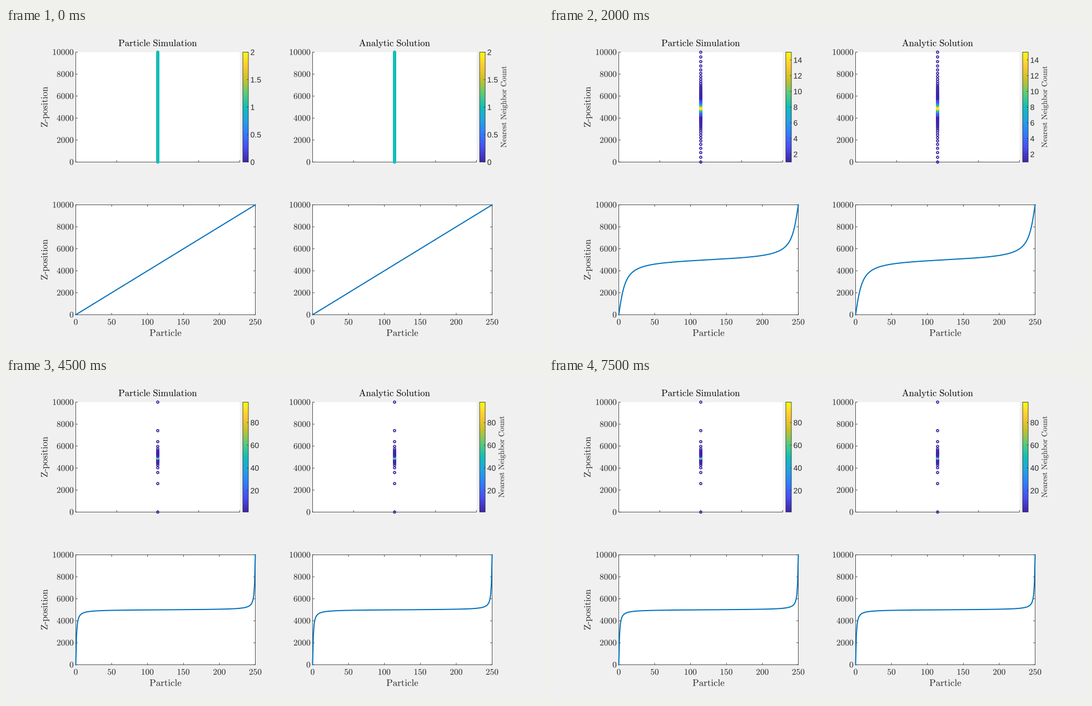
A matplotlib script that plays this animation: 966 by 580 pixels, repeating every 8000 ms.

```python
import numpy as np
import matplotlib.pyplot as plt
from matplotlib.animation import FuncAnimation
from matplotlib.colors import LinearSegmentedColormap
from matplotlib.patches import PathPatch, Rectangle
from matplotlib.path import Path
from matplotlib.textpath import TextPath
from matplotlib.transforms import Affine2D

W, H, DPI = 966, 580, 100
PX = 72 / DPI
INK, BLUE = "#262626", "#0072BD"
THIN = 0.8 * PX
FRAMES, INTERVAL = 16, 500
N = 251
LENGTH = 10000
RADIUS = 26.6            # neighbour search distance
GAIN = 4.8               # peak compression exponent
SHIFT = 426              # distance between the two columns
LEFT, RIGHT_TOP, RIGHT_LOW = 125.5, 420.5, 448.5
TOP1, BOT1, TOP2, BOT2 = 43.5, 241.5, 318.5, 516.5
BAR_X, BAR_W = 426, 10

plt.rcParams["mathtext.fontset"] = "cm"

PARULA = LinearSegmentedColormap.from_list("parula", [
    "#3e26a8", "#484df0", "#337bfd", "#22a3e3", "#12beb9",
    "#5ccc76", "#c9c129", "#fdca33", "#f9fb15"])

fig = plt.figure(figsize=(W / DPI, H / DPI), dpi=DPI, facecolor="#F0F0F0")
ax = fig.add_axes([0, 0, 1, 1])
ax.axis("off")


def text(s, x, y, size, ha=0.5, up=False, serif=True, color=INK):
    """Text with its baseline at pixel (x, y); `up` turns it to read upwards."""
    if serif:
        body = s.replace(" ", r"\ ").replace("-", r"\hspace{0.333}")
        path = TextPath((0, 0), rf"$\mathrm{{{body}}}$", size=size)
    else:
        path = TextPath((0, 0), s, size=size, prop={"family": "Liberation Sans"})
    if s.startswith("Z-"):  # mathtext would set a wide minus sign
        dash = Affine2D().scale(.265 * size, .058 * size).translate(.622 * size, .187 * size)
        path = Path.make_compound_path(path, Path.unit_rectangle().transformed(dash))
    box = path.get_extents()
    dx = -(box.x0 + ha * box.width) if ha else 0
    place = Affine2D().translate(dx, 0).scale(1, -1)
    if up:
        place.rotate_deg(-90)
    place.translate(x, y)
    patch = PathPatch(path.transformed(place), fc=color, lw=0, zorder=6, snap=False)
    return ax.add_patch(patch)


def seg(x0, y0, x1, y1):
    return ax.plot([x0, x1], [y0, y1], color=INK, lw=THIN, zorder=3,
                   solid_capstyle="butt", snap=False)[0]


def y_axis(x, top, bottom, mirror=None):
    for v in range(0, LENGTH + 1, 2000):
        y = bottom + (top - bottom) * v / LENGTH
        seg(x, y, x + 3.5, y)
        if mirror:
            seg(mirror - 3.5, y, mirror, y)
        text(str(v), x - 4.3, y + 4.9, 15.4, ha=1)
    seg(x, top, x, bottom)


def panel(dx):
    """Static parts of one column; returns its centre, markers and curve."""
    x0, x1, x2 = LEFT + dx, RIGHT_TOP + dx, RIGHT_LOW + dx
    mid = (x0 + x1) / 2
    for x, top, bottom in ((x1, TOP1, BOT1), (x2, TOP2, BOT2)):
        ax.add_patch(Rectangle((x0, top), x - x0, bottom - top, fc="white",
                               lw=0, zorder=0, snap=False))

    seg(x0, BOT1, x1, BOT1)
    for x in np.linspace(x0, x1, 5):
        seg(x, BOT1, x, BOT1 - 3.5)
    y_axis(x0, TOP1, BOT1)

    seg(x2, TOP2, x2, BOT2)
    for y in (TOP2, BOT2):
        seg(x0, y, x2, y)
    for v in range(0, 251, 50):
        x = x0 + (x2 - x0) * v / 250
        seg(x, BOT2, x, BOT2 - 3.5)
        seg(x, TOP2, x, TOP2 + 3.5)
        text(str(v), x, 534.4, 15.4)
    y_axis(x0, TOP2, BOT2, x2)
    text("Particle", (x0 + x2) / 2, 554.6, 16.9)

    bx = BAR_X + dx
    ax.imshow(np.linspace(1, 0, 256)[:, None], cmap=PARULA, aspect="auto",
              extent=(bx, bx + BAR_W, BOT1, TOP1), zorder=1)
    ax.add_patch(Rectangle((bx, TOP1), BAR_W, BOT1 - TOP1, fill=False,
                           ec=INK, lw=THIN, zorder=3, snap=False))

    dots = ax.scatter(np.full(N, mid), np.zeros(N), s=(4 * PX) ** 2, facecolors="none",
                      linewidths=1.75 * PX, clip_on=False, zorder=5)
    curve, = ax.plot(np.linspace(x0, x2, N), np.zeros(N), color=BLUE, lw=2 * PX,
                     solid_joinstyle="round", zorder=5, clip_on=False)
    return mid, dots, curve


def positions(k):
    """Particles driven towards the pressure node, the drive varying as a sine."""
    squeeze = np.exp(-GAIN * np.sin(np.pi * k / 24))
    u = np.linspace(-1, 1, N)
    phase = np.arctan(squeeze * np.tan(np.pi / 2 * u[1:-1])) * 2 / np.pi
    return LENGTH / 2 * (1 + np.r_[-1, phase, 1])


def tick_step(span):
    return next(s for s in (.5, 1, 2, 5, 10, 20, 50) if span / s < 8)


columns = [panel(0), panel(SHIFT)]
text("Particle Simulation", 273, 32.6, 16.8, color="black")
text("Analytic Solution", 273 + SHIFT, 32.6, 16.8, color="black")
for top, bottom in ((TOP1, BOT1), (TOP2, BOT2)):
    text("Z-position", 74.6, (top + bottom) / 2 - .5, 16.9, up=True)
ax.set_xlim(0, W)
ax.set_ylim(H, 0)
scale_marks = []


def draw_scale(lo, hi):
    while scale_marks:
        scale_marks.pop().remove()
    step = tick_step(hi - lo)
    ticks = np.arange(np.ceil(lo / step), np.floor(hi / step) + 1) * step
    names = [f"{v:g}" for v in ticks]
    for dx in (0, SHIFT):
        edge = BAR_X + BAR_W + dx
        for v, name in zip(ticks, names):
            y = BOT1 + (TOP1 - BOT1) * (v - lo) / (hi - lo)
            scale_marks.append(seg(edge - 2.5, y, edge, y))
            scale_marks.append(text(name, 439.6 + dx, y + 5.1, 14, ha=0, serif=False))
    # the side label keeps clear of the widest tick label
    width = max(7.8 * len(n) - 3.9 * ("." in n) for n in names)
    scale_marks.append(text("Nearest Neighbor Count", 880.3 + width, 142, 13.9, up=True))


def update(k):
    z = positions(k)
    count = (np.abs(z[:, None] - z) <= RADIUS).sum(axis=1)
    lo, hi = count.min(), count.max()
    if lo == hi:
        lo, hi = lo - 1, hi + 1
    colors = PARULA((count - lo) / (hi - lo))
    for mid, dots, curve in columns:
        dots.set_offsets(np.c_[np.full(N, mid), BOT1 + (TOP1 - BOT1) * z / LENGTH])
        dots.set_edgecolors(colors)
        curve.set_ydata(BOT2 + (TOP2 - BOT2) * z / LENGTH)
    draw_scale(lo, hi)
    return []


anim = FuncAnimation(fig, update, frames=FRAMES, interval=INTERVAL,
                     init_func=lambda: [], repeat=True, repeat_delay=0)
plt.show()
```
